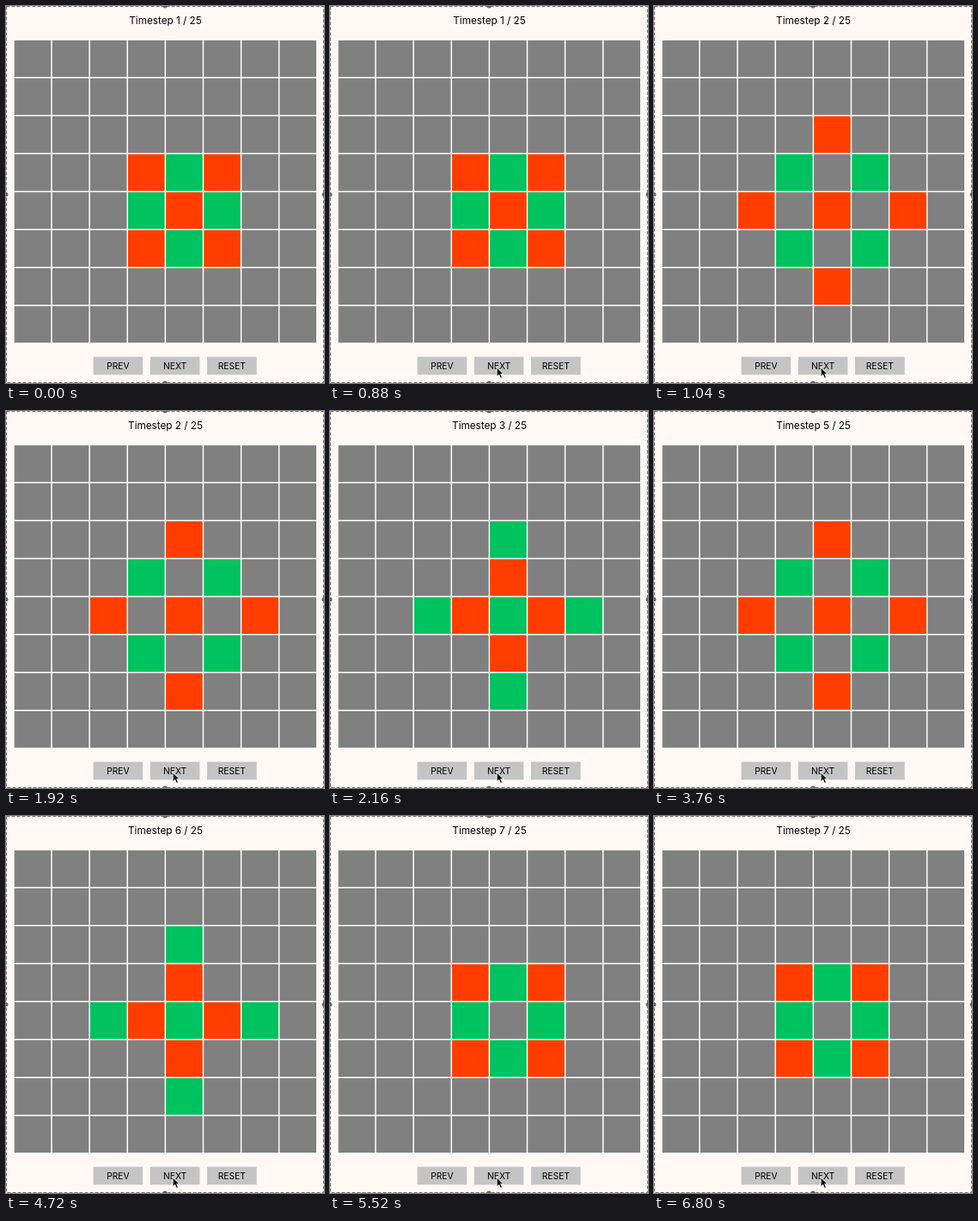
An HTML page for the animation above (7120 ms loop, 370 by 438 pixels).

```html
<!DOCTYPE html>
<html lang="en">
<head>
<meta charset="utf-8">
<title>Cell grid</title>
<style>
  html, body { margin: 0; width: 100%; height: 100%; overflow: hidden; background: #fff8f5; }
  svg { display: block; width: 370px; height: 438px; }
  text { font-family: Inter, sans-serif; text-anchor: middle; fill: #000; }
  #title { font-size: 11.73px; }
  #buttons text { font-size: 10.27px; }
  #buttons rect { fill: #c4c4c4; }
</style>
</head>
<body>
<svg viewBox="0 0 370 438" xmlns="http://www.w3.org/2000/svg">
  <rect width="370" height="438" fill="#fff8f5"/>
  <rect x=".5" y=".5" width="369" height="437" fill="none" stroke="#777" stroke-dasharray="4 2"/>
  <g fill="#666">
    <circle cx="185" cy="0" r="2.5"/>
    <circle cx="185" cy="438" r="2.5"/>
    <circle cx="0" cy="219" r="2.5"/>
    <circle cx="370" cy="219" r="2.5"/>
  </g>
  <text id="title" x="185.5" y="21.2"></text>
  <rect x="8.7" y="38.9" width="353.3" height="353.3" fill="#fff"/>
  <g id="grid"></g>
  <g id="buttons"></g>
  <path id="cursor" d="M.6 .8V11.4L3.1 9.1L4.9 13.2L6.9 12.3L5.2 8.4H8.4Z"
        fill="#000" stroke="#fff" stroke-width=".9"/>
</svg>
<script>
const NS = 'http://www.w3.org/2000/svg';
const LOOP = 7120, SIZE = 8, CENTRE = 4, PITCH = 44.1;
const GREY = '#808080', RED = '#ff3d00', GREEN = '#00c25e';

// Each pattern maps squared distance from the centre cell to a colour.
const start = { 0: RED, 1: GREEN, 2: RED };
const diamond = { 0: RED, 2: GREEN, 4: RED };
const cross = { 0: GREEN, 1: RED, 4: GREEN };
const ring = { 1: GREEN, 2: RED };
const steps = [
  [0, start], [1040, diamond], [2000, cross], [2800, ring],
  [3600, diamond], [4720, cross], [5520, ring]
];
const cursorPath = [
  [320, 195, 422], [480, 194.5, 421.3], [560, 194, 420.5],
  [640, 193.7, 419.8], [720, 193.5, 419.2]
];

const byId = id => document.getElementById(id);
const title = byId('title'), cursor = byId('cursor');

function add(parent, name, attrs) {
  const el = document.createElementNS(NS, name);
  for (const key in attrs) el.setAttribute(key, attrs[key]);
  return parent.appendChild(el);
}

const cells = [];
for (let row = 0; row < SIZE; row++) {
  for (let col = 0; col < SIZE; col++) {
    const el = add(byId('grid'), 'rect', {
      x: 9.7 + col * PITCH, y: 39.9 + row * PITCH, width: 42.6, height: 42.6
    });
    cells.push({ el, d: (col - CENTRE) ** 2 + (row - CENTRE) ** 2 });
  }
}

['PREV', 'NEXT', 'RESET'].forEach((label, i) => {
  const x = 101.6 + i * 66.2;
  add(byId('buttons'), 'rect', { x, y: 407.6, width: 57.6, height: 20.8 });
  add(byId('buttons'), 'text', { x: x + 28.8, y: 421.8 }).textContent = label;
});

const lastBefore = (list, t) => list.findLastIndex(item => item[0] <= t);

let shown = -1;
function showStep(i) {
  if (i === shown) return;
  shown = i;
  title.textContent = `Timestep ${i + 1} / 25`;
  for (const { el, d } of cells) el.setAttribute('fill', steps[i][1][d] || GREY);
}

function draw() {
  const t = performance.now() % LOOP;
  showStep(lastBefore(steps, t));
  const at = cursorPath[lastBefore(cursorPath, t)];
  cursor.setAttribute('visibility', at ? 'visible' : 'hidden');
  if (at) cursor.setAttribute('transform', `translate(${at[1]} ${at[2]})`);
  requestAnimationFrame(draw);
}
draw();
</script>
</body>
</html>
```
